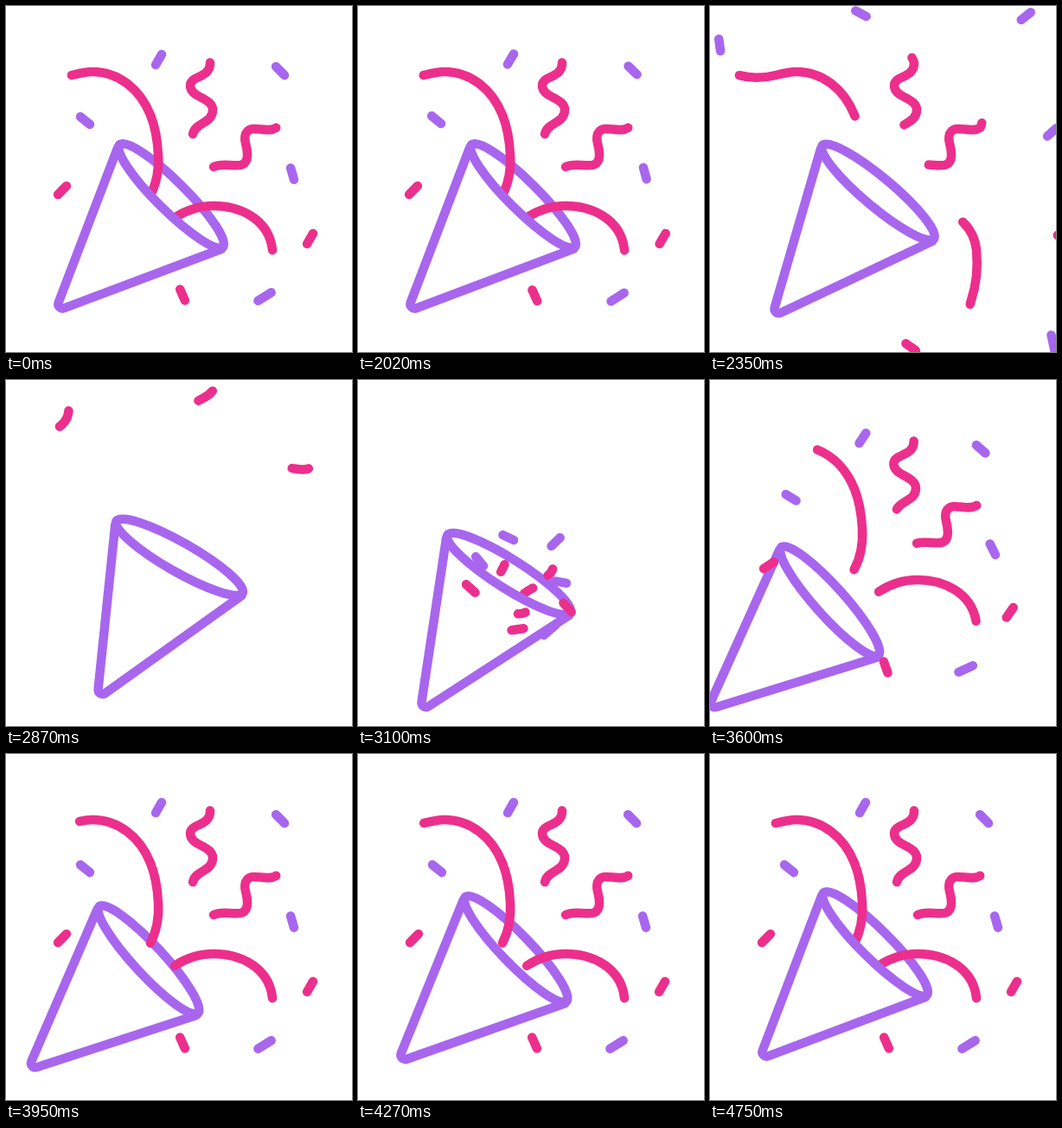
These frames come from a looping animation (400 px wide and 400 px high, 4770 ms). An HTML page with a canvas:

```html
<!DOCTYPE html>
<html lang="en">
<head>
<meta charset="utf-8">
<title>Party popper</title>
<style>
html, body { margin: 0; width: 100%; height: 100%; overflow: hidden; background: #fff; }
canvas { display: block; width: 400px; height: 400px; }
</style>
</head>
<body>
<canvas id="stage" width="400" height="400"></canvas>
<script>
const LOOP = 4770, START = 2020, BURST = 3080;
const PURPLE = '#a866ee', PINK = '#ec2f8c';
const RAD = Math.PI / 180;
const ctx = document.getElementById('stage').getContext('2d');

const clamp = v => Math.min(1, Math.max(0, v));
const span = (t, a, b) => clamp((t - a) / (b - a));
const smooth = u => u * u * (3 - 2 * u);
const outCubic = u => 1 - (1 - u) ** 3;
const mix = (a, b, u) => a + (b - a) * u;

function bezier(x1, y1, x2, y2) {
  const at = (a, b, s) => 3 * (1 - s) ** 2 * s * a + 3 * (1 - s) * s * s * b + s ** 3;
  return u => {
    let lo = 0, hi = 1;
    for (let i = 0; i < 24; i++) {
      const mid = (lo + hi) / 2;
      if (at(x1, x2, mid) < u) lo = mid; else hi = mid;
    }
    return at(y1, y2, lo);
  };
}
const popEase = bezier(0, 0.8, 0.2, 1);
const returnEase = bezier(0.33, 0, 0.4, 1);

function pathLength(d) {
  const p = document.createElementNS('http://www.w3.org/2000/svg', 'path');
  p.setAttribute('d', d);
  return p.getTotalLength();
}

// A ribbon rests on the first part of its path and leaves along the second.
function ribbon(rest, exit, options) {
  const d = rest + exit;
  return { path: new Path2D(d), rest: pathLength(rest), full: pathLength(d), lead: 0, ...options };
}

const ribbons = [
  ribbon('M165 222C174 207 177 190 176 172C175 152 171 136 167 126C155 96 130 76 100 76C92 76 84 78 76 80',
    'C60 84 45 84 30 79C18 75 11 68 11 58C11 42 30 63 54 58C64 54 70 48 72 39C73 32 73 25 73 18',
    { lead: 4, leave: [2000, 3090], grow: 1350 }),
  ribbon('M192 247C204 238 220 231 240 231C270 231 304 246 308 282',
    'C310 304 308 322 302 340C296 360 300 376 325 377C360 379 390 362 430 352',
    { lead: 4, leave: [2000, 2990], grow: 730 }),
  ribbon('M216 148C219 134 239 136 239 120C239 106 213 106 213 92C213 80 236 84 236 66',
    'C232 46 206 60 212 35C214 28 222 24 228 21C238 16 244 8 244 -2',
    { leave: [2210, 3110], grow: 760, from: [-28, 159, 24], mid: [226, 107], curl: true }),
  ribbon('M240 186C254 178 279 194 279 172C279 160 274 156 277 148C283 135 300 148 312 141',
    'C320 132 304 104 317 102C324 101 330 102 337 103C350 105 356 100 362 94',
    { leave: [2210, 3110], grow: 760, from: [-131, 136, 5], mid: [278, 163], curl: true })
];

// x, y, angle, half length, color, exit dx, dy, turn, entry turn
const dashes = [
  [176.5, 62, -60, 7, PURPLE, -2, -53, 88, 140],
  [317, 75, 45, 7, PURPLE, 48, -63, -83, -146],
  [91.5, 132.5, 39, 7, PURPLE, -80, -87, 43, -276],
  [331, 194, 74, 7, PURPLE, 64, -48, 64, -400],
  [299, 336, -32, 9, PURPLE, 97, 53, -70, 281],
  [65, 213, -45, 7, PINK, -90, -5, -60, 438],
  [351.5, 269, -60, 7, PINK, 57, -4, 60, 178],
  [204, 334, 66, 7, PINK, 28, 60, -30, 173]
];
const ORIGIN = [172, 259];

function conePose(t) {
  if (t < START) return { x: 0, y: 0, turn: 0 };
  const peak = 3310;
  const kick = t < peak ? smooth(span(t, 2930, peak)) : 1 - returnEase(span(t, peak, 4750));
  let turn;
  if (t < 2950) turn = mix(0, -15.3, smooth(span(t, 2000, 2950)));
  else if (t < 3550) turn = mix(-15.3, 3.4, smooth(span(t, 2950, 3550)));
  else turn = mix(3.4, 0, smooth(span(t, 3550, 4750)));
  return { x: -58 * kick, y: 39 * kick, turn };
}

function inCone(pose, draw) {
  ctx.save();
  ctx.translate(140 + pose.x, 176 + pose.y);
  ctx.rotate(pose.turn * RAD);
  ctx.translate(-140, -176);
  ctx.strokeStyle = PURPLE;
  draw();
  ctx.restore();
}

function rim(a, b) {
  ctx.beginPath();
  ctx.ellipse(191, 219.5, 84, 17, 44.7 * RAD, a, b);
  ctx.stroke();
}

const sides = new Path2D('M129 164L61 342C59 347 63 351 68 349L249 281');

function drawRibbon(r, t) {
  let a = r.lead, b = r.rest, p = 1;
  const entering = t >= BURST + (r.curl ? 20 : 0);
  if (entering) {
    p = outCubic(span(t, BURST, BURST + r.grow));
    a = r.curl ? r.rest * (1 - p) : r.lead * p;
    b = r.curl ? r.rest : r.rest * p;
  } else if (t >= START) {
    const q = smooth(span(t, ...r.leave));
    a = mix(r.lead, r.full, q);
    b = mix(r.rest, r.full, q);
  }
  if (b - a < 0.5) return;
  ctx.save();
  if (r.from && entering) {
    const [dx, dy, turn] = r.from, [cx, cy] = r.mid, left = 1 - p;
    ctx.translate(cx + dx * left, cy + dy * left);
    ctx.rotate(turn * left * RAD);
    ctx.translate(-cx, -cy);
  }
  ctx.strokeStyle = PINK;
  ctx.setLineDash([b - a, 2000]);
  ctx.lineDashOffset = -a;
  ctx.stroke(r.path);
  ctx.restore();
}

function drawDash([x, y, angle, half, color, dx, dy, turn, spin], t) {
  if (t >= BURST) {
    const left = 1 - popEase(span(t, BURST, BURST + 880));
    x = mix(x, ORIGIN[0], left);
    y = mix(y, ORIGIN[1], left);
    angle += spin * left;
  } else if (t >= START) {
    const k = ((t - 2000) / 350) ** 1.6;
    x += dx * k;
    y += dy * k;
    angle += turn * k;
  }
  const ux = Math.cos(angle * RAD) * half, uy = Math.sin(angle * RAD) * half;
  ctx.strokeStyle = color;
  ctx.beginPath();
  ctx.moveTo(x - ux, y - uy);
  ctx.lineTo(x + ux, y + uy);
  ctx.stroke();
}

function render(t) {
  ctx.fillStyle = '#fff';
  ctx.fillRect(0, 0, 400, 400);
  ctx.lineWidth = 10.5;
  ctx.lineCap = ctx.lineJoin = 'round';
  const pose = conePose(t);
  inCone(pose, () => rim(Math.PI, 2 * Math.PI));
  ribbons.forEach(r => drawRibbon(r, t));
  inCone(pose, () => {
    rim(0, Math.PI);
    ctx.stroke(sides);
  });
  dashes.forEach(d => drawDash(d, t));
}

const begin = performance.now();
function tick() {
  render((performance.now() - begin) % LOOP);
  requestAnimationFrame(tick);
}
tick();
</script>
</body>
</html>
```
